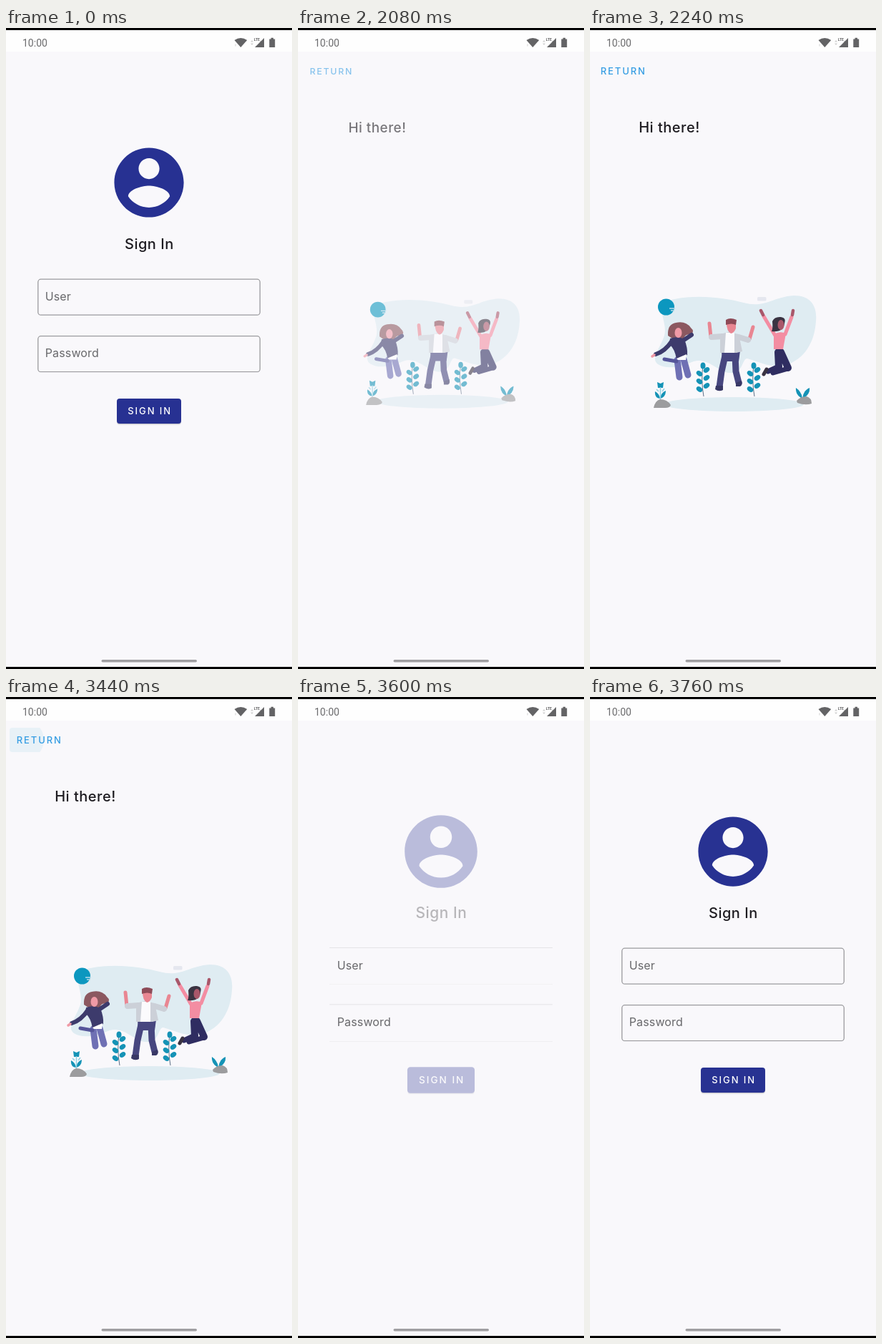
Animation, 400 px wide and 896 px high, one loop 3.8 s. Source, as an HTML page:

```html
<!DOCTYPE html>
<html lang="en">
<head>
<meta charset="utf-8">
<title>Sign in transition</title>
<style>
  html, body { margin: 0; width: 100%; height: 100%; overflow: hidden; background: #f9f8fb; }
  svg { display: block; width: 100%; height: 100%; }
  text { font-family: Inter, sans-serif; }
  .title { font-size: 20px; font-weight: 500; letter-spacing: .5px; fill: #1d1b20; }
  .label { font-size: 13px; font-weight: 500; letter-spacing: 1.9px; }
  .hint { font-size: 16px; letter-spacing: .15px; fill: #68686b; }
  .outline { fill: none; stroke: #9b9b9e; stroke-width: 1.3; }
  .limb { fill: none; stroke-linecap: round; stroke-linejoin: round; }
</style>
</head>
<body>
<svg viewBox="0 0 400 896">
  <defs>
    <clipPath id="userClip"><rect x="44" y="350" width="312" height="52"/></clipPath>
    <clipPath id="passClip"><rect x="44" y="429.500" width="312" height="52"/></clipPath>
    <clipPath id="buttonClip"><rect x="155" y="518" width="90" height="35" rx="4"/></clipPath>
    <clipPath id="returnClip"><rect x="5" y="43" width="83" height="34" rx="4"/></clipPath>
    <g id="sprig" fill="#1593b6">
      <path d="M1 47Q-3 25 0 3" fill="none" stroke="#5b6f86"/>
      <ellipse cx="0" cy="4" rx="3.500" ry="4.500"/>
      <g id="leaves">
        <ellipse cx="5" cy="10" rx="4.600" ry="3.300" transform="rotate(-35 5 10)"/>
        <ellipse cx="-5" cy="15" rx="4.600" ry="3.300" transform="rotate(35 -5 15)"/>
      </g>
      <use href="#leaves" y="11"/>
      <use href="#leaves" y="22"/>
    </g>
  </defs>

  <rect width="400" height="896" fill="#f9f8fb"/>
  <rect y="3" width="400" height="30" fill="#fefefe"/>
  <path d="M0 0H400V3H0ZM0 893H400V896H0Z"/>
  <rect x="133.500" y="883" width="133.500" height="3.500" rx="1.700" fill="#a09fa2"/>

  <!-- Status bar -->
  <text x="23" y="25.500" fill="#6c6c6e" style="font:14px Roboto,sans-serif">10:00</text>
  <g fill="#636365">
    <path d="M328.300 27L319.500 17Q328.300 10.800 337.200 17Z"/>
    <path d="M361 14V27H348L355.500 19.500V18.500H356.500Z"/>
    <path d="M368.300 15.500H370.500V13.800H374V15.500H376.200V27H368.300Z"/>
    <text x="346.800" y="18.300" style="font:700 5px Roboto,sans-serif">LTE</text>
    <path d="M342 19.500L344 17L346 19.500ZM342 21.500L344 24L346 21.500Z" opacity=".3"/>
    <path d="M320.500 22.500H321.500V25.500H320.500Z" opacity=".3"/>
  </g>

  <!-- Welcome screen -->
  <g class="welcome" style="transform-origin:46.500px 60px">
    <g clip-path="url(#returnClip)">
      <circle id="returnRipple" cy="60" fill="#3aa0cf" opacity=".09"/>
    </g>
    <text class="label" x="14.800" y="65" fill="#359de3">RETURN</text>
  </g>
  <text class="title welcome" x="68.200" y="146" style="transform-origin:111.500px 139px">Hi there!</text>
  <g class="welcome" style="transform-origin:202.500px 455px">
    <path fill="#dfecf2" d="M118 379C150 372 190 377 215 384C245 392 255 376 285 374C310 374 318 390 316 410C314 440 300 462 275 471C255 477 235 466 220 462C212 462 215 484 195 482C178 480 165 460 145 466C125 474 108 478 95 470C84 462 98 448 104 430C108 415 97 397 101 388Q106 380 118 379Z"/>
    <ellipse cx="201" cy="526" rx="98" ry="10" fill="#dfecf2"/>
    <circle cx="106.500" cy="390" r="11.500" fill="#0c97bf"/>
    <path d="M111 392H119M113 395H118" stroke="#b9dcea" stroke-width="1.500"/>
    <rect x="234" y="376" width="12.500" height="5.500" rx="1.500" fill="#e5e7ef"/>

    <use href="#sprig" x="158" y="468"/>
    <use href="#sprig" x="229" y="468"/>
    <path fill="#1593b6" d="M94 495L98.500 497L103 495L102 503H95ZM98 518Q90 517 91 508Q97 511 98 518Q99 510 106 507Q106 516 98 518Z"/>
    <path d="M98.500 502V519M93 505L96 508M104 504L101 508" stroke="#8fd0e2" stroke-width="1.500"/>
    <path fill="#1593b6" d="M297 518Q287 513 288 503Q296 508 297 518Q298 507 307 503Q308 513 297 518Z"/>
    <path fill="#9c9c9e" d="M89 531Q91 521 98 519Q108 519 113 527Q112 531 105 531ZM289 521Q294 515 303 515Q310 517 310 525Q301 528 290 524Z"/>

    <!-- Left jumper -->
    <path class="limb" stroke="#6f70b4" stroke-width="9" d="M122 464L125 488M131 463L137 485"/>
    <path class="limb" stroke="#55559a" stroke-width="5" d="M121 466L104 463"/>
    <path fill="#8b5860" d="M109 430Q108 414 120 412Q134 409 141 419Q147 424 141 429Q134 427 131 434Q120 438 112 432Z"/>
    <path class="limb" stroke="#3d3b6c" stroke-width="6" d="M115 437Q105 452 92 456M130 437L142 429"/>
    <path class="limb" stroke="#f09aa6" stroke-width="3.500" d="M90 457L87 459"/>
    <path fill="#3d3b6c" d="M112 434Q123 430 132 435Q137 448 136 457L121 463Q119 449 111 442Z"/>
    <path fill="#fff" d="M121 462L135 456L134 464H123Z"/>
    <ellipse cx="123.500" cy="426" rx="5" ry="7" fill="#f09aa6"/>

    <!-- Middle jumper -->
    <path class="limb" stroke="#47467f" stroke-width="9" d="M189 458L184 480L181 502M203 458L204 480L208 496"/>
    <path fill="#47467f" d="M184 451H210L208 466H185Z"/>
    <path fill="#393866" d="M176 500H186V506Q180 509 175 505ZM204 496L212 493Q214 499 210 501H204Z"/>
    <path class="limb" stroke="#e98692" stroke-width="5" d="M169 432L167 413M223 435L228 418"/>
    <path class="limb" stroke="#ccd0d8" stroke-width="8" d="M186 431L170 432M208 432L221 436"/>
    <path fill="#ccd0d8" d="M182 428L194 425L208 428L213 452L205 454H182Z"/>
    <path fill="#fbfbfd" d="M190 426H202V454H188Z"/>
    <path fill="#e98692" d="M191 412H204V420Q201 427 197 427Q191 424 191 412Z"/>
    <path fill="#8d4a57" d="M190 415V408Q196 404 205 408L204 415Q198 412 190 415Z"/>

    <!-- Right jumper -->
    <path class="limb" stroke="#2f2d61" stroke-width="10" d="M263 453L264 474M267 453L277 475"/>
    <path class="limb" stroke="#2f2d61" stroke-width="7" d="M264 473L249 480M277 476L256 482"/>
    <path class="limb" stroke="#3a3342" stroke-width="5" d="M247 477L243 484"/>
    <path class="limb" stroke="#f38da2" stroke-width="5" d="M259 430L243 403M273 428L282 404"/>
    <path class="limb" stroke="#a9576a" stroke-width="4.500" d="M242 401L239 395M283 401L284 395"/>
    <path fill="#f38da2" d="M257 428Q266 423 274 427L270 449H257Z"/>
    <path fill="#3a3342" d="M254 424Q256 420 255 410Q258 403 267 404Q275 405 272 413Q270 426 254 424Z"/>
    <ellipse cx="267" cy="415" rx="4.500" ry="7" fill="#a9576a"/>
  </g>

  <!-- Sign-in screen -->
  <g class="signin" style="transform-origin:200px 216px">
    <path fill="#273192" transform="translate(141.700 157.700) scale(4.860)" d="M12 2C6.480 2 2 6.480 2 12s4.480 10 10 10 10-4.480 10-10S17.520 2 12 2zm0 3c1.660 0 3 1.340 3 3s-1.340 3-3 3-3-1.340-3-3 1.340-3 3-3zm0 14.200c-2.500 0-4.710-1.280-6-3.220.030-1.990 4-3.080 6-3.080 1.990 0 5.970 1.090 6 3.080-1.290 1.940-3.500 3.220-6 3.220z"/>
  </g>
  <text class="title signin" x="166" y="309" style="transform-origin:200px 302px">Sign In</text>
  <g clip-path="url(#userClip)">
    <rect class="outline signin" x="44.800" y="351.200" width="310.400" height="50" rx="4" style="transform-origin:200px 376px"/>
  </g>
  <g clip-path="url(#passClip)">
    <rect class="outline signin" x="44.800" y="430.700" width="310.400" height="50" rx="4" style="transform-origin:200px 455.500px"/>
  </g>
  <g id="hints">
    <text class="hint" x="54.700" y="381">User</text>
    <text class="hint" x="54.700" y="460">Password</text>
  </g>
  <g class="signin" style="transform-origin:200px 535.500px">
    <rect x="155" y="519.500" width="90" height="35" rx="4" opacity=".16"/>
    <rect x="155" y="518" width="90" height="35" rx="4" fill="#273192"/>
    <g clip-path="url(#buttonClip)">
      <circle id="buttonRipple" cy="535.500" fill="#fff" opacity=".24"/>
    </g>
    <text class="label" x="170.300" y="540" fill="#fff">SIGN IN</text>
  </g>
</svg>
<script>
const LOOP = 3800, STEP = 40, DURATION = 300;
const FORWARD = 1940, BACK = 3490;
const byId = id => document.getElementById(id);
const signin = document.querySelectorAll('.signin');
const welcome = document.querySelectorAll('.welcome');
const clamp = v => Math.min(1, Math.max(0, v));

// cubic-bezier(.4, 0, .2, 1), solved by bisection
function ease(x) {
  if (x <= 0 || x >= 1) return clamp(x);
  let low = 0, high = 1;
  for (let i = 0; i < 24; i++) {
    const s = (low + high) / 2, r = 1 - s;
    if (1.2 * s * r * r + 0.6 * s * s * r + s ** 3 < x) low = s; else high = s;
  }
  return low * low * (3 - 2 * low);
}

function pose(views, alpha, scale) {
  for (const view of views) {
    view.style.opacity = clamp(alpha);
    view.style.transform = `scale(${scale})`;
  }
}

const fadeOut = p => 1 - p / 0.35;
const fadeIn = p => (p - 0.35) / 0.65;

function ripple(id, age, x, drift) {
  byId(id).setAttribute('cx', x + drift * age);
  byId(id).setAttribute('r', age < 0 || age > 320 ? 0 : 28 + 0.35 * age);
}

function draw(t) {
  if (t < BACK) {
    const p = ease((t - FORWARD) / DURATION);
    pose(signin, fadeOut(p), 1 + 0.1 * p);
    pose(welcome, fadeIn(p), 0.8 + 0.2 * p);
  } else {
    const p = ease((t - BACK) / DURATION);
    pose(welcome, fadeOut(p), 1 - 0.2 * p);
    pose(signin, fadeIn(p), 1.1 - 0.1 * p);
  }
  byId('hints').style.opacity = t < FORWARD || t >= BACK ? 1 : 0;
  ripple('buttonRipple', t - 1920, 190, 0.08);
  ripple('returnRipple', t - 3440, 25, 0.12);
}

const start = performance.now();
function tick() {
  const t = (performance.now() - start) % LOOP;
  draw(Math.floor(t / STEP) * STEP);
  requestAnimationFrame(tick);
}
tick();
</script>
</body>
</html>
```
